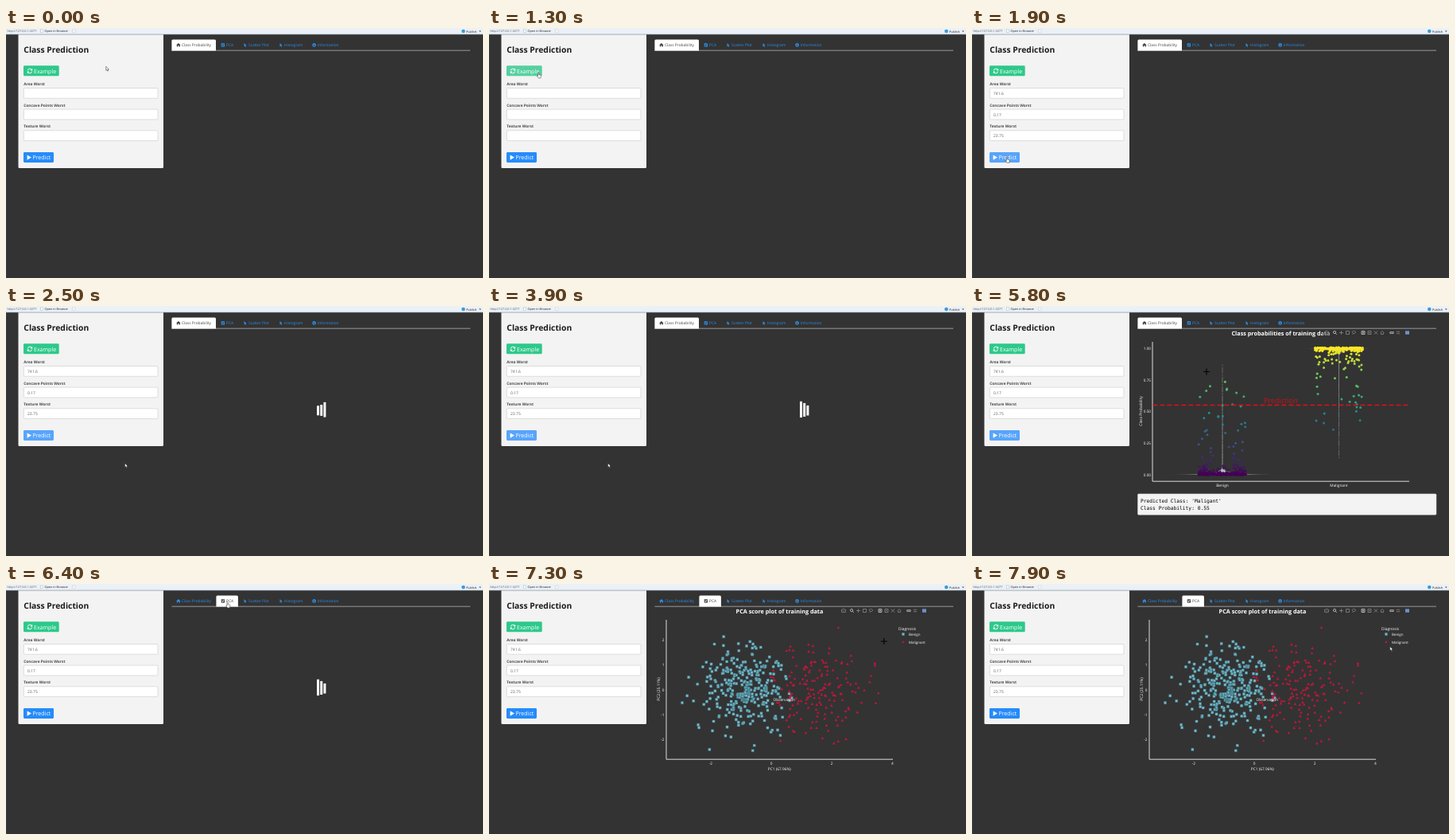
Animation, 600 px wide and 314 px high, one loop 8000 ms. Source, as an HTML page:

```html
<!DOCTYPE html>
<html lang="en">
<head>
<meta charset="utf-8">
<title>Class Prediction</title>
<style>
  html, body { margin: 0; width: 100%; height: 100%; overflow: hidden; background: #333; }
  svg { display: block; width: 600px; height: 314px; font-family: "Open Sans", sans-serif; text-rendering: geometricPrecision; }
  .mono { font-family: "DejaVu Sans Mono", monospace; white-space: pre; }
</style>
</head>
<body>
<svg id="stage" viewBox="0 0 600 314"></svg>
<script>
const stage = document.getElementById('stage');
const LOOP = 8000;

// ---- drawing helpers ----
function el(name, attrs, parent = stage) {
  const node = document.createElementNS('http://www.w3.org/2000/svg', name);
  for (const key in attrs) node.setAttribute(key, attrs[key]);
  parent.appendChild(node);
  return node;
}
const group = (attrs = {}, parent = stage) => el('g', attrs, parent);
const at = (x, y, parent) => group({ transform: `translate(${x} ${y})` }, parent);
const rect = (x, y, width, height, fill, parent, extra) =>
  el('rect', { x, y, width, height, fill, ...extra }, parent);
const path = (d, fill, parent, extra) => el('path', { d, fill, ...extra }, parent);
const line = (d, stroke, width, parent, extra) =>
  path(d, 'none', parent, { stroke, 'stroke-width': width, ...extra });
function text(str, x, y, size, fill, parent, extra) {
  const node = el('text', { x, y, 'font-size': size, fill, ...extra }, parent);
  node.textContent = str;
  return node;
}
const show = (node, on) => node.setAttribute('display', on ? 'inline' : 'none');
const BOLD = { 'font-weight': 700 };
const MIDDLE = { 'text-anchor': 'middle' };
const ease = u => (1 - Math.cos(Math.PI * u)) / 2;
const inside = (v, low, high) => v >= low && v < high;

let seed = 4127;
const random = () => (seed = (seed * 48271) % 2147483647) / 2147483647;
const spread = size => (random() - .5) * size;
const normal = () => Math.sqrt(-2 * Math.log(random())) * Math.cos(2 * Math.PI * random());

// ---- page ----
rect(0, 0, 600, 314, '#333');
rect(0, 8, .5, 306, '#3d4858');
rect(0, 0, 600, 8, '#ebf1f7');
rect(0, 7.4, 600, .8, '#b4c2d2');
text('http://127.0.0.1:3277', 1.5, 5.4, 3.8, '#555');
rect(43.5, 2, 3, 3.4, '#fff', stage, { stroke: '#8aa', 'stroke-width': .4 });
text('Open in Browser', 48.5, 5.4, 3.8, '#222');
rect(83.5, 2, 3.6, 3.6, '#f8f8f8', stage, { stroke: '#b9c2cc', 'stroke-width': .4 });
el('circle', { cx: 575.3, cy: 4, r: 2.3, fill: '#3b9bd6' });
text('Publish', 579, 5.5, 3.8, '#222');
path('M595 3.4h2.6l-1.3 1.6z', '#333');

path('M15.5 8.2H198V174.5a1.5 1.5 0 0 1-1.5 1.5H17a1.5 1.5 0 0 1-1.5-1.5z', '#f3f3f3');
text('Class Prediction', 22.3, 31, 10.35, '#1c1c1c', stage, BOLD);

const exampleButton = rect(22, 47.3, 44.7, 13, '#2dc98a', stage, { rx: 1.4 });
const refresh = at(30, 54);
line('M-2.7 -.6A2.8 2.8 0 0 1 2.2 -1.8M2.7 .6A2.8 2.8 0 0 1 -2.2 1.8', '#fff', 1, refresh);
path('M3.2 -3.2V-.5H.5zM-3.2 3.2V.5H-.5z', '#fff', refresh);
text('Example', 35, 56.7, 7.05, '#fff');

const values = group();
[['Area Worst', '741.6'], ['Concave Points Worst', '0.17'], ['Texture Worst', '23.75']].forEach(([label, value], i) => {
  const y = 72 + i * 26.65;
  text(label, 22.2, y, 4.85, '#4a4a4a', stage, BOLD);
  rect(22.4, y + 3.5, 168.6, 12.8, '#fff', stage, { rx: 1, stroke: '#c9c9c9', 'stroke-width': .6 });
  text(value, 27, y + 12, 5, '#606060', values);
});
stage.appendChild(values);

const predictButton = rect(22, 156, 38, 13, '#268bfa', stage, { rx: 1.4 });
path('M26.6 159.4l5.4 3.2-5.4 3.2z', '#fff');
text('Predict', 33.4, 165.1, 7.05, '#fff');

// ---- tabs ----
line('M208.5 28.2H584', '#c4c4c4', .7);
const pointerIcon = 'M-1.4 -2.4L1.8 .7H.4L1.2 2.2.4 2.6-.4 1.1-1.4 2z';
const tabs = [
  ['Class Probability', 221, 'M-2.8 .2L0 -2.4 2.8 .2H2V2.2H.6V.6H-.6V2.2H-2V.2z', 55.6],
  ['PCA', 277, 'M-2.2 -2.2H2.2V2.2H-2.2zM-1.5 0L-.4 1.3 1.6 -1 1.1 -1.5-.4 .2-1 -.5z', 27.5],
  ['Scatter Plot', 305, pointerIcon],
  ['Histogram', 350, pointerIcon],
  ['Information', 391.7, 'M0 -2.3A2.3 2.3 0 0 1 0 2.3 2.3 2.3 0 0 1 0 -2.3zM-.4 -1.5V-.8H.4V-1.5zM-.4 -.3V1.5H.4V-.3z']
].map(([label, x, icon, width]) => {
  const back = width && path(`M${x - 12.6} 28.5V16q0-1.5 1.5-1.5h${width - 3}q1.5 0 1.5 1.5V28.5z`, '#fff');
  const ink = group();
  path(icon, 'inherit', at(x - 4.1, 21.4, ink), { 'fill-rule': 'evenodd' });
  text(label, x, 23.3, 4.85, 'inherit', ink);
  return active => {
    if (back) show(back, active);
    ink.setAttribute('fill', active ? '#444' : '#2a8ee8');
  };
});

// ---- chart parts ----
function modebar(parent) {
  rect(441, 29.5, 113, 9, '#333', parent, { opacity: .5 });
  const bar = group({ fill: 'none', stroke: '#8a8a8a', 'stroke-width': .8 }, parent);
  const box = 'M-2 -2H2V2H-2z';
  const sections = [
    [446, ['M-2.4 -1.4H-1L-.5 -2.2H.5L1 -1.4H2.4V1.9H-2.4zM-.6 .2H.6']],
    [456.5, ['M.8 .8L2.4 2.4M-2 -.5a1.6 1.6 0 1 0 3.2 0a1.6 1.6 0 1 0 -3.2 0', 'M-2.4 0H2.4M0 -2.4V2.4', box,
      'M-1.6 2.3L-1 .9C-4 -1 -1 -2.4 .7 -2C3.2 -1.2 2.4 1.2 -1 .9']],
    [492, [box + 'M-1.2 0H1.2M0 -1.2V1.2', box + 'M-1.2 0H1.2', 'M-2.2 -2.2L2.2 2.2M2.2 -2.2L-2.2 2.2',
      'M-2.4 .2L0 -2 2.4 .2M-1.5 0V2H1.5V0']],
    [528, ['M-2.2 -.8H2.2V.9H-2.2z', 'M-2.2 -1.2H2.2M-2.2 1.2H2.2']]
  ];
  for (const [x, icons] of sections)
    icons.forEach((d, i) => path(d, 'none', at(x + 8 * i, 33.5, bar), x === 446 || i ? {} : { stroke: '#ccc' }));
  rect(545, 31.3, 5, 4.4, '#6f8fc8', bar, { stroke: 'none' });
}
function axes(parent, left, right, title, titleX) {
  line(`M${left} 45V220.2H${right}`, '#f0f0f0', .9, parent);
  text(title, titleX, 36.5, 7.25, '#fff', parent, { ...BOLD, ...MIDDLE });
  modebar(parent);
}
const tickY = (label, x, y, parent) => text(label, x, y + 1.8, 4.7, '#fff', parent, { 'text-anchor': 'end' });
const caption = (label, x, y, parent) => text(label, x, y, 4.8, '#fff', parent, MIDDLE);
const sideCaption = (label, x, parent) =>
  text(label, 0, 0, 4.9, '#fff', parent, { ...MIDDLE, transform: `translate(${x} 132) rotate(-90)` });

// ---- class probability chart ----
const probability = group();
const FLOOR = 212, HEIGHT = 159;
axes(probability, 227, 550, 'Class probabilities of training data', 388.5);
for (let p = 0; p <= 1; p += .25) tickY(p.toFixed(2), 225, FLOOR - p * HEIGHT, probability);
sideCaption('Class Probability', 213.8, probability);

// Both strips pile up at their own end of the scale and thin out towards the other.
function viridis(p) {
  const stops = [[68, 1, 84], [59, 82, 139], [33, 144, 140], [93, 200, 99], [253, 231, 37]];
  const s = Math.min(.9999, Math.max(0, p)) * 4, i = Math.floor(s);
  return `rgb(${stops[i].map((c, k) => Math.round(c + (stops[i + 1][k] - c) * (s - i)))})`;
}
function strip(label, x, end, halfWidth, pile, strays, reach) {
  const toY = d => FLOOR - HEIGHT * Math.abs(end - d);
  const [base, neck, far] = [0, .05, .87].map(toY);
  caption(label, x, 227.3, probability);
  path(`M${x - halfWidth} ${base}Q${x - 4} ${base} ${x - .6} ${neck}L${x} ${far}L${x + .6} ${neck}` +
    `Q${x + 4} ${base} ${x + halfWidth} ${base}z`, '#777', probability);
  line(`M${x} ${neck}V${far}`, '#858585', .6, probability, { 'stroke-dasharray': '7 1.5 2 1.5' });
  const dot = d => el('circle', { cx: x + spread(60), cy: toY(d), r: 1.5, fill: viridis(Math.abs(end - d)) }, probability);
  for (let i = 0; i < pile; i++) dot(Math.min(.12, .007 * Math.log(random()) ** 2) + spread(.014));
  for (let i = 0; i < strays; i++) dot(.06 + reach * random() ** 1.6);
}
strip('Benign', 315, 0, 72, 280, 46, .68);
strip('Malignant', 461.5, 1, 40, 180, 48, .62);
path('M312.5 207l2-3 1.5 2 1.5-1 2 3-2 1-1.5-1-1.5 1z', '#bbb', probability);

line('M227.4 124.5H550', '#e01018', 1.3, probability, { 'stroke-dasharray': '6 3' });
text('Prediction', 388.5, 122.4, 9.1, '#d01018', probability, MIDDLE);

rect(208.5, 236, 375.5, 26.3, '#f3f3f3', probability, { rx: 1.2, stroke: '#ccc', 'stroke-width': .6 });
["Predicted Class: 'Maligant'", 'Class Probability: 0.55'].forEach((row, i) =>
  text(row, 212, 246.5 + i * 9.8, 6.27, '#000', probability, { class: 'mono' }));

// ---- PCA chart ----
const pca = group();
axes(pca, 223, 508, 'PCA score plot of training data', 365.5);
for (let v = -2; v <= 4; v += 2) caption(v, 355 + v * 38.1, 227.3, pca);
for (let v = -2; v <= 2; v++) tickY(v, 220.5, 132.7 - v * 31.1, pca);
caption('PC1 (67.96%)', 365.3, 234.2, pca);
sideCaption('PC2 (25.11%)', 214.5, pca);

const square = (x, y) => `M${x - 1.6} ${y - 1.6}h3.2v3.2h-3.2z`;
const triangle = (x, y) => `M${x} ${y - 1.8}l1.8 3.2h-3.6z`;
const drawBenign = d => path(d, '#76bccd', pca, { stroke: '#3d6f7d', 'stroke-width': .4 });
const drawMalignant = d => path(d, '#bd173b', pca);
function cloud(count, cx, sx, sy, left, right, mark) {
  let d = '';
  while (count) {
    const x = cx + normal() * sx, y = 132 + normal() * sy;
    if (inside(x, left, right) && inside(y, 50, 213)) { d += mark(x, y); count--; }
  }
  return d;
}
drawBenign(cloud(310, 319, 27, 28, 238, 384, square));
drawMalignant(cloud(175, 409, 35, 29, 354, 496, triangle));
caption('Observation', 371.2, 147.2, pca);
text('Diagnosis', 515, 58.4, 4.9, '#fff', pca);
drawBenign(square(521, 63));
drawMalignant(triangle(521, 72.7));
text('Benign', 528, 64.8, 4.5, '#fff', pca);
text('Malignant', 528, 74.6, 4.5, '#fff', pca);

// ---- loading bars ----
const loader = group();
const bars = [0, 1, 2].map(i => rect(391 + i * 4.2, 125, 3, 12, '#fff', loader));
function poseBars(phase) {
  bars.forEach((bar, i) => {
    const p = (((phase + .16 * (2 - i)) % 1) + 1) % 1;
    const lift = p < .8 ? ease(1 - Math.abs(p - .4) / .4) : 0;
    bar.setAttribute('y', 125.3 - 5.5 * lift);
    bar.setAttribute('height', 12 + 8.3 * lift);
  });
}

// ---- mouse ----
const mouse = group();
const outline = { stroke: '#222', 'stroke-width': .5 };
const cursors = {
  arrow: path('M0 0V5L1.2 4 2 5.8 2.9 5.4 2.1 3.7H3.6z', '#fff', mouse, outline),
  hand: path('M-.6 .5Q0 -.4 .6 .5V3L3 3.6Q3.4 3.8 3.3 4.5L2.7 7.3H0L-1.9 4.6Q-1.8 3.8 -.6 4.6z', '#fff', mouse, outline),
  cross: line('M-4 0H4M0 -4V4', '#000', 1.1, mouse)
};
// Each move runs from one time to another and ends at a point.
const moves = [
  [100, 400, 119, 50], [800, 1300, 62.2, 55.6], [1500, 1800, 44, 162], [2100, 2400, 149.6, 197.5],
  [5100, 5800, 295, 82.5], [5800, 6100, 278.6, 22.6], [6600, 7500, 525.8, 78.6]
];
function mouseAt(t) {
  let x = 125.8, y = 48.3;
  for (const [from, to, endX, endY] of moves) {
    const u = ease(Math.min(1, Math.max(0, (t - from) / (to - from))));
    x += (endX - x) * u;
    y += (endY - y) * u;
  }
  return [x, y];
}

// ---- timeline ----
const FILL = 1500, PREDICT = 1900, LOADING = 2000, RESULT = 5000, SWITCH = 6200, SCORES = 7100;

function draw(t) {
  const [x, y] = mouseAt(t);
  const over = (left, top, right, bottom) => inside(x, left, right) && inside(y, top, bottom);
  const overExample = over(22, 47, 67, 60), overPredict = over(22, 156, 60, 169), overTab = over(208, 14, 292, 28);
  const hasProbability = inside(t, RESULT, SWITCH), hasScores = t >= SCORES;

  exampleButton.setAttribute('fill', overExample || inside(t, 1400, PREDICT) ? '#55d0a0' : '#2dc98a');
  predictButton.setAttribute('fill', overPredict || inside(t, PREDICT, SWITCH) ? '#58a4fb' : '#268bfa');
  show(values, t >= FILL);
  tabs.forEach((setActive, i) => setActive(i === (t < SWITCH ? 0 : 1)));
  show(probability, hasProbability);
  show(pca, hasScores);
  show(loader, inside(t, LOADING, RESULT) || inside(t, SWITCH, SCORES));
  poseBars((t - (t < SWITCH ? 3900 : 6400)) / 900 + .07);

  const kind = overExample || overPredict || overTab ? 'hand'
    : (hasProbability || hasScores) && over(227, 42, 508, 220) ? 'cross' : 'arrow';
  for (const name in cursors) show(cursors[name], name === kind);
  mouse.setAttribute('transform', `translate(${x} ${y})`);
}

const start = performance.now();
function tick() {
  const elapsed = (performance.now() - start) % LOOP;
  draw(Math.floor(elapsed / 100) * 100);
  requestAnimationFrame(tick);
}
tick();
</script>
</body>
</html>
```
